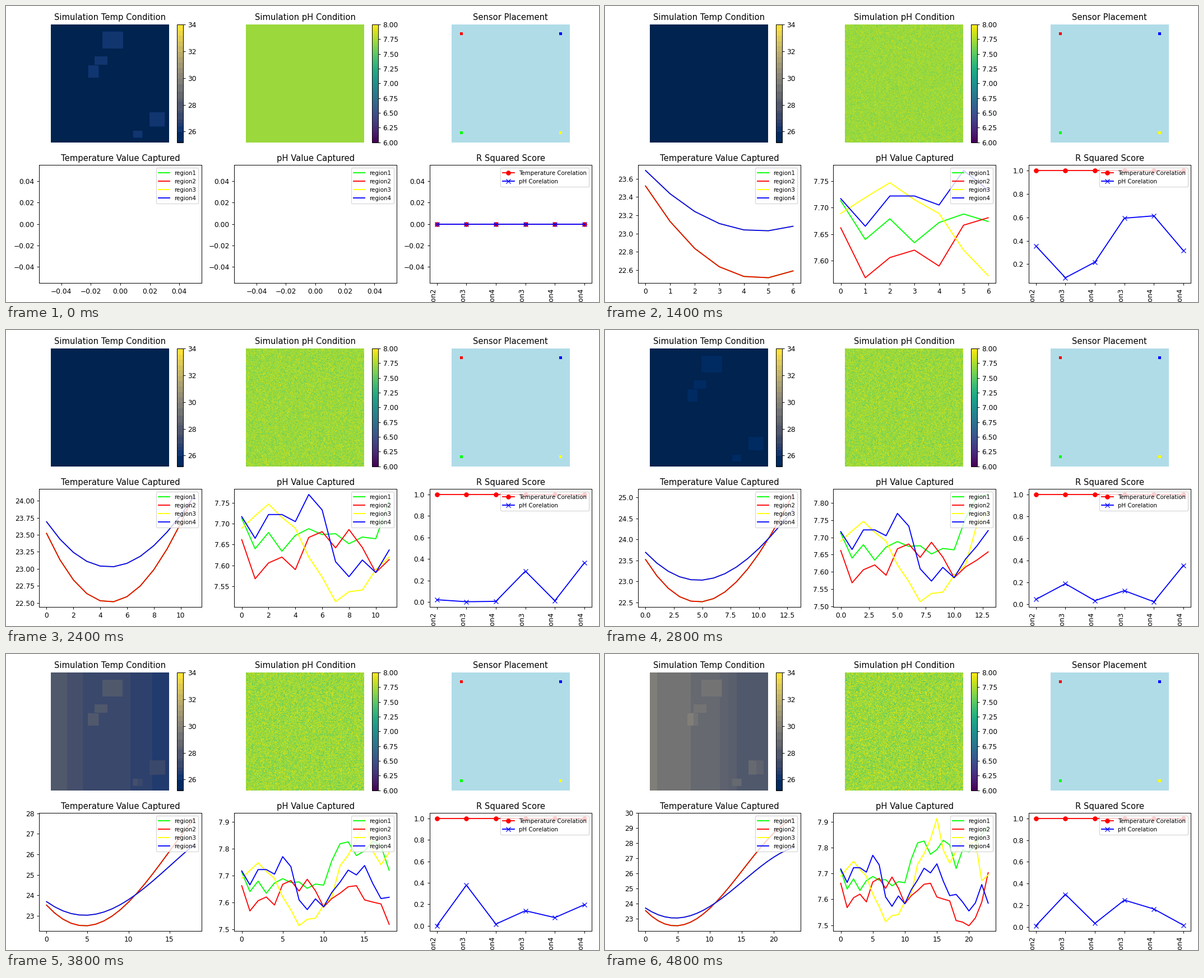
A matplotlib script that plays this animation: 1058x529 px, repeating every 5 s.

```python
from itertools import combinations

import matplotlib.pyplot as plt
import numpy as np
from matplotlib.animation import FuncAnimation
from matplotlib.colors import ListedColormap

WIDTH, HEIGHT = 1058, 529
FRAMES, INTERVAL = 25, 200
GRID = 200
T_MIN, T_MAX = 25.2, 34
REGIONS = ["region1", "region2", "region3", "region4"]
COLORS = ["lime", "red", "yellow", "blue"]
PAIRS = list(combinations(range(4), 2))

# Temperature: a smooth curve on the left side, linearly damped on the right.
hours = np.arange(FRAMES - 1)
curve = np.polynomial.Polynomial.fit(
    [0, 2, 4, 5, 7, 9, 13, 16, 20, 23],
    [23.52, 22.84, 22.53, 22.515, 22.75, 23.295, 25.07, 26.685, 28.675, 29.645], 5)
left_temp = curve(hours)
right_temp = 23.03 + 0.657 * (left_temp - 22.515)
temps = np.array([left_temp, left_temp, right_temp, right_temp])

# pH readings, in thousandths away from 7.7.
ph = 7.7 + np.array([
    [13, -60, -21, -66, -28, -12, -26, -24, -48, -32, -36, 55,
     118, 125, 74, 92, 128, 110, 19, 90, 83, 110, 150, 180],
    [-38, -132, -94, -80, -110, -33, -19, -58, -14, -57, -117, -86,
     -66, -42, -38, -91, -99, -106, -182, -188, -202, -172, -111, 3],
    [-11, 19, 47, 15, -11, -80, -128, -187, -163, -159, -110, -80,
     36, 76, 132, 212, 90, 40, 85, 130, 110, 125, -28, -6],
    [17, -35, 22, 22, 5, 70, 33, -91, -127, -87, -117, -63,
     -25, 20, 2, 37, -30, -86, -81, -110, -145, -114, -43, -115],
]) / 1000

rng = np.random.default_rng(4)
steps = rng.normal(0, 0.027, (FRAMES, GRID, GRID))
steps[0] = 0
ph_maps = 7.7 + np.cumsum(steps, axis=0)

# Warm patches as (x0, x1, y0, y1) in grid cells.
warm = np.zeros((GRID, GRID))
for x0, x1, y0, y1 in [(87, 122, 12, 41), (74, 96, 54, 68), (63, 81, 69, 90),
                       (167, 193, 149, 173), (139, 155, 180, 192)]:
    warm[y0:y1, x0:x1] = 1


def temp_map(frame):
    if frame == 0:
        return 25 + 1.3 * warm
    row = np.linspace(left_temp[frame - 1], right_temp[frame - 1], GRID)
    return row + 0.6 * warm


def banded_cividis():
    edges = np.r_[25.3, 25.94, 26.39, 26.62, 26.89, 27.4, 27.57, 28.22,
                  28.36, 28.5, 28.97, 29.54, np.arange(29.95, 33.9, 0.4)]
    levels = np.r_[T_MIN, edges, T_MAX]
    middles = (levels[:-1] + levels[1:]) / 2
    band = np.searchsorted(edges, np.linspace(T_MIN, T_MAX, 256))
    return ListedColormap(plt.get_cmap("cividis")((middles[band] - T_MIN) / (T_MAX - T_MIN)))


def sensor_map():
    image = np.ones((GRID, GRID, 3)) * np.array([176, 220, 232]) / 255
    for x, y, color in [(14, 181, (0, 1, 0)), (14, 13, (1, 0, 0)),
                        (182, 181, (1, 1, 0)), (182, 13, (0, 0, 1))]:
        image[y:y + 5, x:x + 5] = color
    return image


def r_squared(series, count):
    if count < 2:
        return np.zeros(len(PAIRS))
    r = np.corrcoef(series[:, :count])
    return np.round([r[a, b] ** 2 for a, b in PAIRS], 9)


fig, axes = plt.subplots(2, 3, figsize=(12, 6), dpi=WIDTH / 12)
fig.subplots_adjust(left=59.2 / WIDTH, right=1045 / WIDTH, top=1 - 32.8 / HEIGHT,
                    bottom=1 - 495.2 / HEIGHT, wspace=0.2032, hspace=0.1935)
(temp_ax, ph_ax, sensor_ax), (temp_plot, ph_plot, score_plot) = axes

titles = ["Simulation Temp Condition", "Simulation pH Condition", "Sensor Placement",
          "Temperature Value Captured", "pH Value Captured", "R Squared Score"]
for ax, title in zip(axes.flat, titles):
    ax.set_title(title)
for ax in axes[0]:
    ax.set_axis_off()

temp_image = temp_ax.imshow(temp_map(0), cmap=banded_cividis(), vmin=T_MIN, vmax=T_MAX)
ph_image = ph_ax.imshow(ph_maps[0], cmap="viridis", vmin=6, vmax=8)
sensor_ax.imshow(sensor_map(), interpolation="nearest")
fig.colorbar(temp_image, ax=temp_ax)
fig.colorbar(ph_image, ax=ph_ax)


def region_lines(ax):
    lines = [ax.plot([], [], color=c, label=name)[0] for c, name in zip(COLORS, REGIONS)]
    ax.legend(loc="upper right", fontsize="small")
    return lines


temp_lines = region_lines(temp_plot)
ph_lines = region_lines(ph_plot)
zeros = np.zeros(len(PAIRS))
temp_score, = score_plot.plot(zeros, "ro-", label="Temperature Corelation")
ph_score, = score_plot.plot(zeros, "bx-", label="pH Corelation")
score_plot.legend(loc="upper right", fontsize="small")
score_plot.set_xticks(range(len(PAIRS)), [f"{REGIONS[a]}-{REGIONS[b]}" for a, b in PAIRS],
                      rotation=90, ha="right")


def update(frame):
    temp_image.set_data(temp_map(frame))
    ph_image.set_data(ph_maps[frame])
    for lines, series in ((temp_lines, temps), (ph_lines, ph)):
        for line, values in zip(lines, series):
            line.set_data(hours[:frame], values[:frame])
    temp_score.set_ydata(r_squared(temps, frame))
    ph_score.set_ydata(r_squared(ph, frame))
    for ax in axes[1]:
        ax.relim()
        ax.autoscale_view()
    return []


anim = FuncAnimation(fig, update, frames=FRAMES, interval=INTERVAL, repeat=True,
                     repeat_delay=0, blit=False)
plt.show()
```
